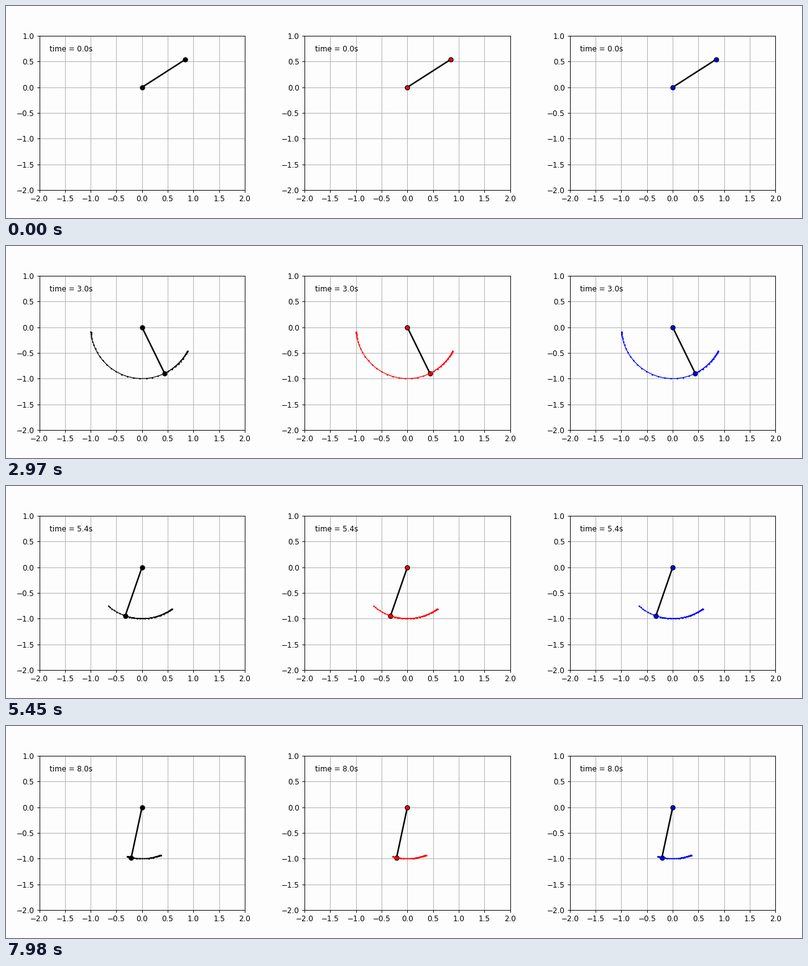
A matplotlib script that plays this animation: 1280x341 px, repeating every 8 s.

```python
import numpy as np
import matplotlib.pyplot as plt
from matplotlib.animation import FuncAnimation

WIDTH, HEIGHT = 1280, 341
DPI = 256 / 3
LOOP_MS, FRAMES, FPS = 8000, 240, 30
BOX = (53.52, 45.05, 330.4, 247.8)  # first axes: left, bottom, width, height in px
TRAIL = 50                          # trace length in points
SUBSTEPS = 10

G, DAMPING, LENGTH = 9.81, 0.5, 1.0
START = np.array([np.pi - 1, 1.0])  # angle from straight down, angular speed
STEP = 20 / 599                     # 600 samples spanning 20 s, ends included


def deriv(state):
    theta, omega = state
    return np.array([omega, -G / LENGTH * np.sin(theta) - DAMPING * omega])


def rk4(state, h):
    k1 = deriv(state)
    k2 = deriv(state + h / 2 * k1)
    k3 = deriv(state + h / 2 * k2)
    k4 = deriv(state + h * k3)
    return state + h / 6 * (k1 + 2 * k2 + 2 * k3 + k4)


def swing():
    """Bob positions, one per frame."""
    state, angles = START, []
    for _ in range(FRAMES):
        angles.append(state[0])
        for _ in range(SUBSTEPS):
            state = rk4(state, STEP / SUBSTEPS)
    angles = np.array(angles)
    return LENGTH * np.sin(angles), -LENGTH * np.cos(angles)


def make_panel(fig, col, color):
    left, bottom, width, height = BOX
    ax = fig.add_axes([left / WIDTH + col / 3, bottom / HEIGHT,
                       width / WIDTH, height / HEIGHT],
                      xlim=(-2, 2), ylim=(-2, 1), facecolor="none")
    ax.set_xticks(np.arange(-2, 2.1, 0.5))
    ax.set_yticks(np.arange(-2, 1.1, 0.5))
    ax.grid()
    rod, = ax.plot([], [], "o-", color="black", lw=2, mfc=color)
    trace, = ax.plot([], [], ".-", color=color, lw=1, ms=2)
    label = ax.text(0.05, 0.9, "", transform=ax.transAxes)
    return rod, trace, label


plt.rcParams["font.family"] = "DejaVu Sans"
fig = plt.figure(figsize=(WIDTH / DPI, HEIGHT / DPI), dpi=DPI,
                 facecolor="#fdfdfd")
panels = [make_panel(fig, i, c) for i, c in enumerate(("black", "red", "blue"))]
x, y = swing()


def update(i):
    recent = slice(max(0, i - TRAIL + 1), i + 1)
    for rod, trace, label in panels:
        rod.set_data([0, x[i]], [0, y[i]])
        trace.set_data(x[recent], y[recent])
        label.set_text(f"time = {i / FPS:.1f}s")
    return [artist for panel in panels for artist in panel]


anim = FuncAnimation(fig, update, frames=FRAMES, interval=LOOP_MS / FRAMES,
                     repeat=True, repeat_delay=0)
plt.show()
```
